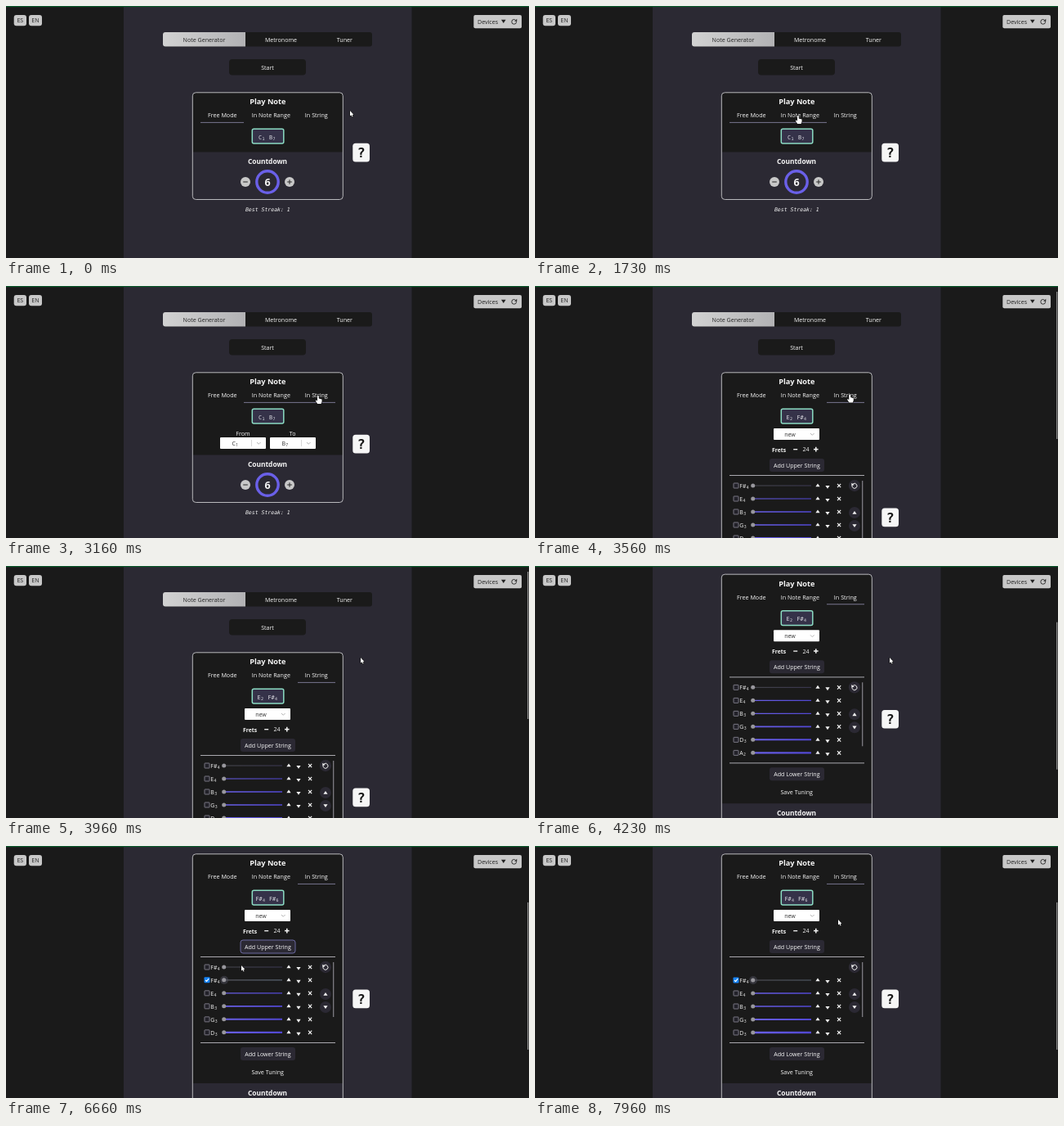
These frames come from a looping animation (640x308 px, 8 s). An HTML page with a canvas:

```html
<!DOCTYPE html>
<html lang="en">
<head>
<meta charset="utf-8">
<title>Note generator</title>
<style>
  html, body { margin: 0; width: 100%; height: 100%; overflow: hidden; background: #1a1a1a; }
  canvas { display: block; width: 640px; height: 308px; }
</style>
</head>
<body>
<canvas></canvas>
<script>
const canvas = document.querySelector('canvas');
const ctx = canvas.getContext('2d');
const ratio = window.devicePixelRatio || 1;
canvas.width = 640 * ratio;
canvas.height = 308 * ratio;

const LOOP = 8000;
const DARK = '#1a1a1a', PLUM = '#2b2933', LIGHT = '#c8c8c8', WHITE = '#f6f6f6', PURPLE = '#6a60e8';
const SANS = '"Open Sans", "Noto Sans", sans-serif';
const MONO = '"DejaVu Sans Mono", monospace';

// Moments of the interactions, in ms
const RANGE_CLICK = 1810, STRING_CLICK = 3470, SCROLL = 3990, CHECK = 5560, ADD = 6350, REMOVE = 7480;

// Cursor stops: time, x, y
const cursorPath = [
  [130, 421, 128], [930, 403, 133], [1560, 322, 134], [2650, 322, 134], [3110, 382, 134],
  [3500, 382, 134], [3900, 434, 112], [4300, 434, 112], [5100, 262, 148], [5420, 249, 150],
  [5760, 249, 150], [6220, 306, 122], [6400, 306, 122], [6660, 288, 146], [6830, 288, 146],
  [7330, 371, 147], [7620, 371, 147], [7940, 371, 90]
];
const tabs = [['Free Mode', 238, 291, 264.8], ['In Note Range', 291, 357, 324.3], ['In String', 357, 403, 379.8]];
const strings = ['F#4', 'E4', 'B3', 'G3', 'D3', 'A2', 'E2'];

const clamp = v => Math.max(0, Math.min(1, v));
const ease = v => { v = clamp(v); return v * v * (3 - 2 * v); };
const progress = (t, start, length) => ease((t - start) / length);

function cursorAt(t) {
  let [last, x, y] = cursorPath[0];
  for (const [time, nx, ny] of cursorPath) {
    if (t < time) {
      const p = progress(t, last, time - last);
      return [x + (nx - x) * p, y + (ny - y) * p];
    }
    [last, x, y] = [time, nx, ny];
  }
  return [x, y];
}

function text(s, x, y, { size = 7.1, weight = 400, color = WHITE, align = 'center', font = SANS, style = '' } = {}) {
  ctx.font = `${style} ${weight} ${size}px ${font}`;
  ctx.textAlign = align;
  ctx.fillStyle = color;
  ctx.fillText(s, x, y);
}

function note(name, x, y, options = {}) {
  const base = { align: 'left', size: 7, ...options };
  const letters = name.slice(0, -1);
  text(letters, x, y, base);
  const width = ctx.measureText(letters).width;
  text(name.slice(-1), x + width + .3, y + 1.2, { ...base, size: 5 });
}

function box(x, y, w, h, r, fill, stroke, line = 1) {
  ctx.beginPath();
  ctx.roundRect(x, y, w, h, r);
  if (fill) { ctx.fillStyle = fill; ctx.fill(); }
  if (stroke) { ctx.strokeStyle = stroke; ctx.lineWidth = line; ctx.stroke(); }
}

function disc(x, y, r, fill) {
  ctx.beginPath();
  ctx.arc(x, y, r, 0, 7);
  ctx.fillStyle = fill;
  ctx.fill();
}

function path(points, color, width) {
  ctx.beginPath();
  points.forEach(([x, y], i) => i ? ctx.lineTo(x, y) : ctx.moveTo(x, y));
  if (width) { ctx.strokeStyle = color; ctx.lineWidth = width; ctx.stroke(); }
  else { ctx.fillStyle = color; ctx.fill(); }
}

const hline = (x1, x2, y, color, width = 1) => path([[x1, y], [x2, y]], color, width);
const triangle = (x, y, dir, color, r = 2.6) =>
  path([[x - r, y + dir * r * .7], [x + r, y + dir * r * .7], [x, y - dir * r * .8]], color);

function plus(x, y, r, color, width, vertical = true) {
  hline(x - r, x + r, y, color, width);
  if (vertical) path([[x, y - r], [x, y + r]], color, width);
}

function turnArrow(x, y, r, color, dir) {
  ctx.beginPath();
  ctx.arc(x, y, r, dir > 0 ? 0 : -2.2, dir > 0 ? 5.2 : 3.2);
  ctx.strokeStyle = color;
  ctx.lineWidth = 1;
  ctx.stroke();
  path([[x + dir * r * 1.25, y - r * 1.2], [x + dir * r * 1.2, y], [x + dir * r * .1, y - r * .4]], color);
}

function select(x, y, draw, divider) {
  box(x, y, 56, 14, 1, '#fff');
  draw();
  if (divider) path([[x + 38.5, y + 3], [x + 38.5, y + 11]], '#ccc', .8);
  path([[x + 45, y + 6], [x + 47.3, y + 8.3], [x + 49.6, y + 6]], '#b5b5b5', 1);
}

function button(label, y, outline) {
  box(287, y, 67, 16, 3, PLUM, outline && '#6b68a0');
  text(label, 320.4, y + 10.6);
}

function stringRow(name, y, index, checked, alpha) {
  ctx.globalAlpha = alpha;
  if (checked) {
    box(242.5, y - 3.5, 7, 7, 1, '#1683f5');
    path([[244, y], [245.5, y + 1.6], [248.2, y - 1.8]], '#fff', 1.1);
    disc(267, y, 5, '#34343b');
  } else {
    box(243, y - 3, 6, 6, .5, '#222129', '#85838f', .9);
  }
  note(name, 250.3, y + 2.8);
  const thickness = .8 + Math.min(index, 6) * .3;
  const colors = name === 'F#4' ? ['#55565e', checked ? '#586270' : '#464166'] : [PURPLE, '#5147d2'];
  const shade = ctx.createLinearGradient(267, 0, 338, 0);
  shade.addColorStop(0, colors[0]);
  shade.addColorStop(1, colors[1]);
  hline(267, 338, y, shade, thickness);
  disc(266.7, y, 2.5, '#98979d');
  triangle(346, y - .5, 1, WHITE);
  triangle(358, y + 1.7, -1, WHITE);
  path([[370, y - 2.2], [374.2, y + 2.2]], WHITE, 1.2);
  path([[374.2, y - 2.2], [370, y + 2.2]], WHITE, 1.2);
  ctx.globalAlpha = 1;
}

function stringPanel(t) {
  select(292, 174, () => text('new', 312, 184, { color: '#333' }));
  text('Frets', 298.5, 202.5, { weight: 700, size: 6.8 });
  plus(318.7, 199.7, 2.5, WHITE, 1.3, false);
  text('24', 331.5, 202.4);
  plus(343.8, 199.6, 2.8, WHITE, 1.5);
  button('Add Upper String', 211, t > ADD && t < REMOVE);
  hline(238, 403, 231.5, '#aaa9af');

  ctx.save();
  ctx.beginPath();
  ctx.rect(236, 232, 170, 104);
  ctx.clip();
  const shift = 16 * progress(t, ADD, 330);
  const added = progress(t, ADD, 300) * (1 - progress(t, REMOVE, 280));
  if (added) stringRow('F#4', 244, 0, false, added);
  strings.forEach((name, i) => stringRow(name, 244 + i * 16 + shift, i + shift / 16, i === 0 && t >= CHECK, 1));
  ctx.restore();

  disc(391, 244, 7.2, PLUM);
  turnArrow(391, 244.3, 3, WHITE, -1);
  for (const [y, dir] of [[277, 1], [293, -1]]) {
    disc(391, y, 7, PLUM);
    triangle(391, y, dir, WHITE);
  }
  hline(238, 403, 336.5, '#aaa9af');
  path([[400.7, 238], [400.7, t < ADD ? 316 : 305]], '#85848b', 1.2);
  button('Add Lower String', 342);
  text('Save Tuning', 320.2, 374.8);
}

function countdown(top) {
  text('Countdown', 320, top + 15, { weight: 700, size: 8.4 });
  const y = top + 37;
  ctx.beginPath();
  ctx.arc(320, y, 13.2, 0, 7);
  ctx.strokeStyle = PURPLE;
  ctx.lineWidth = 3.4;
  ctx.stroke();
  text('6', 320, y + 4.6, { weight: 700, size: 12.5 });
  for (const x of [293, 347]) {
    disc(x, y, 6, LIGHT);
    plus(x, y, 2.8, '#333', 1.1, x > 320);
  }
}

function page(t, cursor, scroll) {
  const bar = ctx.createLinearGradient(192, 0, 293, 0);
  bar.addColorStop(0, '#d2d2d2');
  bar.addColorStop(1, '#b2b2b4');
  box(192, 32, 256, 17.5, 3, DARK);
  box(192, 32, 101, 17.5, [3, 0, 0, 3], bar);
  text('Note Generator', 242.5, 43.8, { color: '#252525' });
  text('Metronome', 336.5, 43.8);
  text('Tuner', 414.3, 43.8);
  box(273, 65, 94, 19.5, 4, DARK);
  text('Start', 320, 77.8);

  const mode = t < RANGE_CLICK ? 0 : t < STRING_CLICK ? 1 : 2;
  const bottom = [236.5, 264.5, 444][mode];
  box(228.3, 105.8, 184, bottom - 105.8, 4, DARK);
  box(228.3, bottom - 58, 184, 58, [0, 0, 4, 4], PLUM);
  box(228.3, 105.8, 184, bottom - 105.8, 4, null, '#b9b9bd');
  text('Play Note', 320.3, 120.4, { weight: 700, size: 9.2 });

  const pointerY = cursor[1] + scroll;
  tabs.forEach(([label, left, right, center], i) => {
    text(label, center, 136.3, { size: 7.2 });
    const hovered = cursor[0] > left && cursor[0] < right && pointerY > 125 && pointerY < 143;
    if (i === mode || hovered) hline(left, right, 142.4, '#77758e', 1);
  });

  const range = mode < 2 ? ['C1', 'B7'] : t < CHECK ? ['E2', 'F#4'] : ['F#4', 'F#6'];
  box(301.3, 150.3, 38.5, 17.8, 2, '#353249', '#8cdcc4', 1.5);
  const tight = range[0].length + range[1].length;
  const starts = tight === 4 ? [309, 322] : tight === 5 ? [307.5, 320.5] : [305.5, 322];
  range.forEach((name, i) => note(name, starts[i], 162.6, { font: MONO, size: 6.8, color: '#dedee4' }));

  if (mode === 1) {
    text('From', 290, 182.6);
    text('To', 350.6, 182.6);
    select(262, 185, () => note('C1', 276.5, 195, { color: '#333' }), true);
    select(323, 185, () => note('B7', 337.5, 195, { color: '#333' }), true);
  }
  if (mode === 2) stringPanel(t);

  countdown(bottom - 58.5);
  text('Best Streak: 1', 320.3, bottom + 14.6, { font: MONO, size: 6.5, style: 'italic' });

  const help = (105.8 + bottom) / 2 + 8;
  box(424.3, help - 11.3, 20.7, 22.6, 3.5, WHITE);
  text('?', 434.6, help + 6, { font: MONO, weight: 700, size: 16.5, color: '#161616' });
}

function drawCursor(t, [x, y], scroll) {
  const pageY = y + scroll;
  const onTab = x > 238 && x < 403 && pageY > 125 && pageY < 143;
  const onButton = x > 287 && x < 354 && pageY > 211 && pageY < 227;
  const onRemove = x > 368 && x < 376 && pageY > 239 && pageY < 249;
  const shape = onTab || onButton || onRemove
    ? [[-1, 0], [.6, 0], [.8, 3.4], [4.6, 4.6], [4.5, 7.5], [3.5, 10], [-.8, 10], [-3.2, 6.2], [-2.4, 5.4], [-1, 6.6]]
    : [[0, 0], [0, 6.6], [1.5, 5.3], [2.6, 7.6], [3.6, 7.1], [2.6, 4.9], [4.4, 4.8]];
  const placed = shape.map(([dx, dy]) => [x + dx, y + dy]);
  ctx.lineJoin = 'round';
  path([...placed, placed[0]], '#111', 1.1);
  path(placed, '#fff');
}

function draw(t) {
  ctx.setTransform(ratio, 0, 0, ratio, 0, 0);
  ctx.fillStyle = DARK;
  ctx.fillRect(0, 0, 640, 308);
  ctx.fillStyle = PLUM;
  ctx.fillRect(144, 0, 352.5, 308);

  const scroll = 96 * progress(t, SCROLL, 250);
  const cursor = cursorAt(t);
  ctx.save();
  ctx.translate(0, -scroll);
  page(t, cursor, scroll);
  ctx.restore();

  ctx.fillStyle = '#0b5a2c';
  ctx.fillRect(0, 0, 640, 1.2);
  box(9.7, 11, 15.3, 13.3, 3, LIGHT);
  box(28, 11, 16, 13.3, 3, LIGHT);
  text('ES', 17.3, 20.4, { color: '#222' });
  text('EN', 36, 20.4, { color: '#222' });
  box(572.3, 11, 58.7, 16.2, 2, LIGHT);
  text('Devices', 577, 21.8, { color: '#222', align: 'left' });
  triangle(608.8, 18.8, -1, '#222', 2.8);
  turnArrow(621.7, 19.3, 2.9, '#333', 1);

  if (t >= STRING_CLICK) {
    ctx.fillStyle = '#8c8c8c';
    ctx.fillRect(638, 7 + scroll * .645, 1.4, 180);
  }
  drawCursor(t, cursor, scroll);
}

function tick() {
  draw(performance.now() % LOOP);
  requestAnimationFrame(tick);
}
tick();
</script>
</body>
</html>
```
